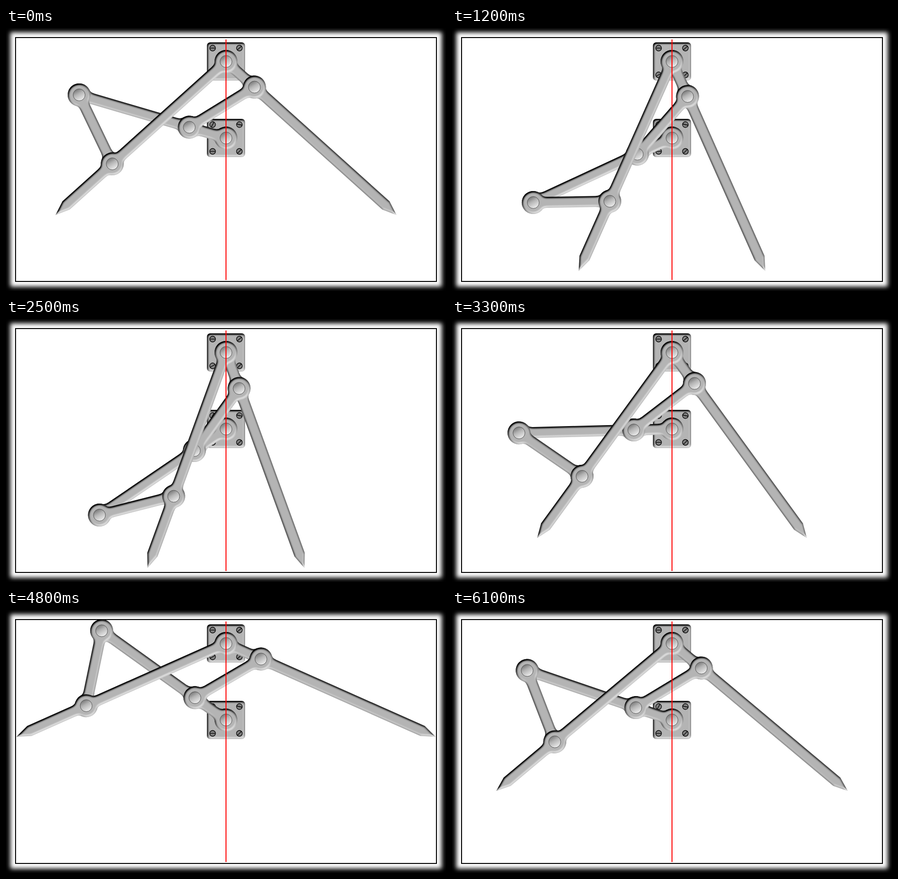
Recreate the animation shown at these times as an HTML page. Size 920 by 550 pixels, loop 6200 ms.

```html
<!DOCTYPE html>
<html lang="en">
<head>
<meta charset="utf-8">
<title>Angle-mirroring linkage</title>
<style>
html, body { margin: 0; width: 100%; height: 100%; overflow: hidden; background: #000; }
svg { display: block; }
</style>
</head>
<body>
<svg id="stage" width="920" height="550" viewBox="0 0 920 550">
  <defs>
    <filter id="soft" filterUnits="userSpaceOnUse" x="-20" y="-20" width="960" height="590">
      <feGaussianBlur stdDeviation="5"/>
    </filter>
    <!-- Bevel lit from the lower right; applied to unrotated groups so the light stays fixed -->
    <filter id="bevel" filterUnits="userSpaceOnUse" x="0" y="0" width="920" height="550" color-interpolation-filters="sRGB">
      <feGaussianBlur in="SourceAlpha" stdDeviation="2"/>
      <feDiffuseLighting surfaceScale="4.5" diffuseConstant="0.86" lighting-color="#fff">
        <feDistantLight azimuth="63" elevation="55"/>
      </feDiffuseLighting>
      <feComposite in2="SourceAlpha" operator="in"/>
    </filter>
    <linearGradient id="dome" x1="0.25" y1="0.05" x2="0.75" y2="0.95">
      <stop offset="0" stop-color="#777"/>
      <stop offset="0.4" stop-color="#b4b4b4"/>
      <stop offset="1" stop-color="#eee"/>
    </linearGradient>
  </defs>
  <rect width="920" height="550"/>
  <rect x="9" y="9" width="902" height="532" fill="#fff" filter="url(#soft)"/>
  <rect x="20" y="20" width="880" height="510" fill="#fff" stroke="#000" stroke-width="2"/>
  <g id="machine"></g>
  <path d="M460 24V527" stroke="#f00" stroke-width="2"/>
</svg>
<script>
const machine = document.getElementById('machine');
const A = [460, 70], B = [460, 230];
const UNIT = 80, HALF = 11.5, STEP = 100, STEPS = 62;

function add(parent, tag, attrs) {
  const el = document.createElementNS('http://www.w3.org/2000/svg', tag);
  for (const key in attrs) el.setAttribute(key, attrs[key]);
  return parent.appendChild(el);
}

function plate([cx, cy], slots) {
  add(machine, 'rect', {x: cx - 40, y: cy - 40, width: 80, height: 80, rx: 7, filter: 'url(#bevel)'});
  slots.forEach((angle, i) => {
    const x = cx + (i % 2 ? 28 : -28), y = cy + (i < 2 ? -28 : 28);
    const screw = add(machine, 'g', {
      transform: `translate(${x} ${y}) rotate(${angle})`, stroke: '#000', 'stroke-width': 1.3
    });
    add(screw, 'circle', {r: 6, fill: '#808080'});
    add(screw, 'path', {d: 'M-6 0H6'});
  });
}

// A bar along +x with an eye at each joint and, optionally, a pointed end
function link(joints, end, pointed, pins) {
  const lit = add(machine, 'g', {filter: 'url(#bevel)'});
  const body = add(lit, 'g', {});
  const tip = pointed ? `L${end - 30} ${-HALF}L${end} 0L${end - 30} ${HALF}` : `H${end}V${HALF}`;
  add(body, 'path', {d: `M0 ${-HALF}${tip}H0Z`});
  for (const x of joints) {
    add(body, 'circle', {cx: x, r: 24});
    for (const side of [1, -1]) {
      if ((x === 0 && side < 0) || (x === end && side > 0)) continue;
      add(body, 'path', {
        transform: `translate(${x}) scale(${side} 1)`,
        d: `M17 -17Q21 ${-HALF} 29 ${-HALF}V${HALF}Q21 ${HALF} 17 17Z`
      });
    }
  }
  const domes = pins.map(() => add(machine, 'circle', {
    r: 12.5, fill: 'url(#dome)', stroke: '#555', 'stroke-width': 1
  }));
  return (from, to) => {
    const dx = to[0] - from[0], dy = to[1] - from[1], len = Math.hypot(dx, dy);
    body.setAttribute('transform', `translate(${from}) rotate(${Math.atan2(dy, dx) * 180 / Math.PI})`);
    domes.forEach((dome, i) => {
      dome.setAttribute('cx', from[0] + dx / len * pins[i]);
      dome.setAttribute('cy', from[1] + dy / len * pins[i]);
    });
  };
}

plate(A, [0, -42, -30, -45]);
plate(B, [-60, 12, 0, -45]);
const rightArm = link([0, UNIT], 480, true, []);
const crank = link([0, UNIT, 320], 320, false, [0]);
const shortRod = link([0, 160], 160, false, [0, 160]);
const outerRod = link([0, 160], 160, false, [0]);
const leftArm = link([0, 320], 480, true, [0, 320]);

const polar = (r, a) => [A[0] + r * Math.sin(a), A[1] + r * Math.cos(a)];

// Fourth corner of the crossed parallelogram A-B-?-p: mirror p + AB in the line through p and B
function crossed(p) {
  const dx = B[0] - p[0], dy = B[1] - p[1], ab = B[1] - A[1];
  const k = 2 * ab * dy / (dx * dx + dy * dy);
  return [p[0] + k * dx, p[1] + k * dy - ab];
}

function pose(step) {
  // Two degrees per step between 10 and 70, holding one step at each limit
  const s = (step + 11) % STEPS;
  const degrees = s < 31 ? 70 - 2 * s : 2 * s - 52;
  const a = degrees * Math.PI / 180;
  const C = polar(UNIT, a), F = polar(320, -a);
  const D = crossed(C), E = crossed(F);
  rightArm(A, C);
  crank(B, E);
  shortRod(C, D);
  outerRod(E, F);
  leftArm(A, F);
}

let shown = -1;
function tick() {
  const step = Math.floor(performance.now() / STEP) % STEPS;
  if (step !== shown) pose(shown = step);
  requestAnimationFrame(tick);
}
tick();
</script>
</body>
</html>
```
